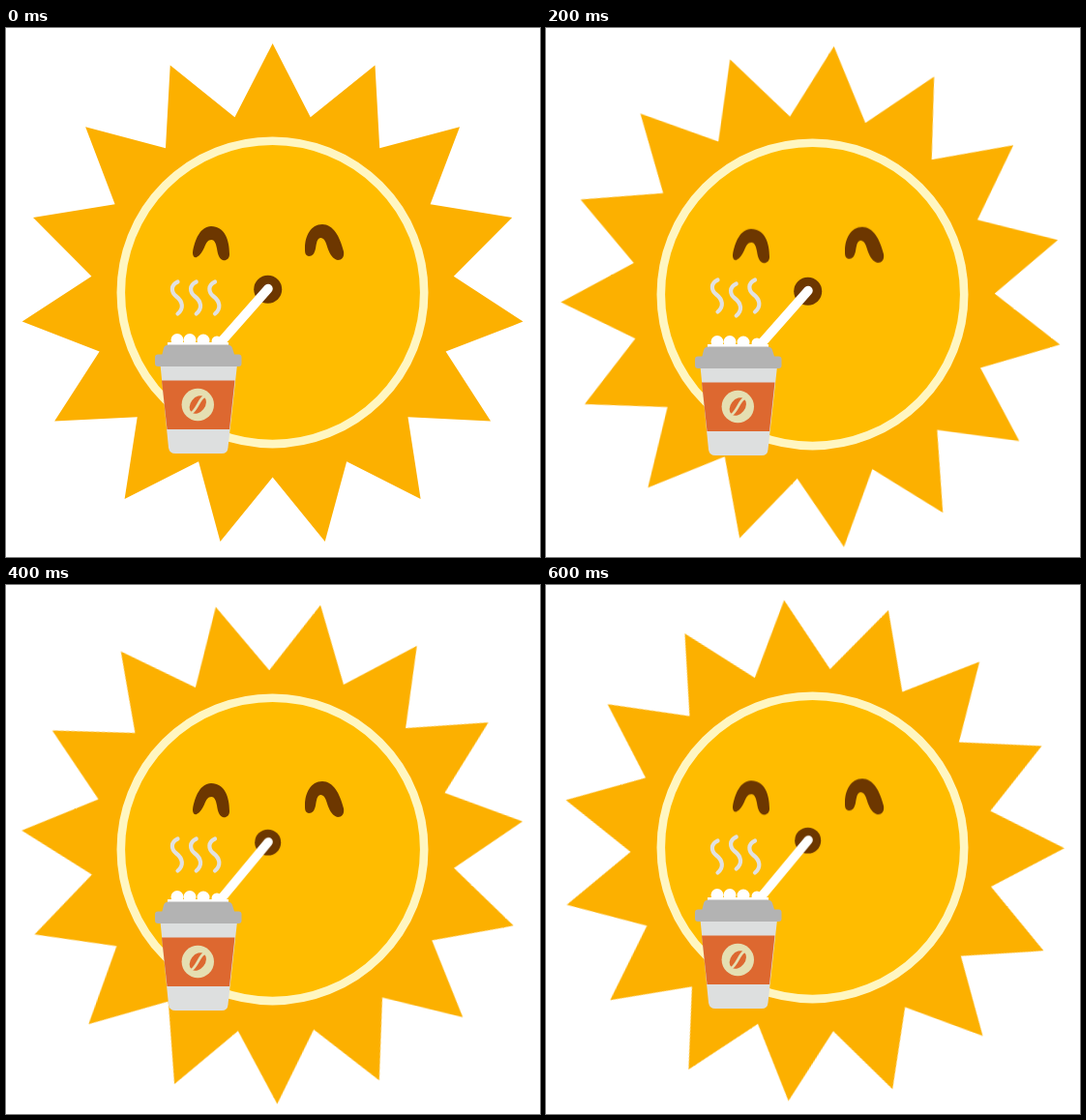
An HTML page that plays this animation: 552 px wide and 547 px high, repeating every 800 ms.

```html
<!DOCTYPE html>
<html lang="en">
<head>
<meta charset="utf-8">
<title>Sun sipping coffee</title>
<style>
  html, body { margin: 0; width: 100%; height: 100%; overflow: hidden; background: #fff; }
  svg { display: block; width: 100vw; height: 100vh; }

  .bob, #rays, .sip, .straw { animation: 800ms step-end infinite; }
  .bob { --d: 2px; animation-name: bob; }
  .eyes { --d: 2.7px; }
  .steam.outer { --d: -2px; }
  #rays { transform-origin: 275.6px 276.4px; animation-name: turn; }
  .sip { transform-origin: 270.7px 270.2px; animation-name: sip; }
  .straw { transform-origin: 222px 325px; animation-name: lean; }

  @keyframes bob {
    0%, 50%, 100% { transform: translateY(0); }
    25% { transform: translateY(var(--d)); }
    75% { transform: translateY(calc(var(--d) * -1)); }
  }
  @keyframes turn {
    0% { transform: rotate(0deg); }
    25% { transform: rotate(4.85deg); }
    50% { transform: rotate(10.95deg); }
    75%, 100% { transform: rotate(17.5deg); }
  }
  @keyframes sip {
    0%, 100% { transform: none; }
    50% { transform: translateY(-4px) scale(.93); }
  }
  @keyframes lean {
    0%, 100% { transform: none; }
    50% { transform: skewY(-4.2deg); }
  }

  .eyes, .sip { fill: #6d3700; }
  .straw { stroke: #fff; stroke-width: 9.5; stroke-linecap: round; }
  .steam { fill: none; stroke: #e1e1e1; stroke-width: 4.2; stroke-linecap: round; }
</style>
</head>
<body>
<svg viewBox="0 0 552 547" preserveAspectRatio="none">
  <defs>
    <path id="wisp" d="M177.5 262.5C170 266 170.5 273 176 277.5C183 283 184 290 177.5 295.5"/>
  </defs>

  <g class="bob">
    <polygon id="rays" fill="#fcb000"/>
    <circle cx="275.5" cy="273.4" r="156.7" fill="#ffbc00" stroke="#fff6c1" stroke-width="8.6"/>
  </g>

  <g class="bob eyes">
    <path d="M193 232C195 219 201 205 212 205C226 205 231 219 231 234C231 239 227 241 224 240C220 238 219 234 218 228C217 222 215 219 212.500 219C208.500 219 207 222 205 227C203 231 201 235 197 237C194 238 193 235 193 232Z"/>
    <path d="M309 228C309 215 315 203 327 203C338 203 345 215 349 231C350 237 347 240 343 240C338 239 335 234 333 229C331 223 330 217.500 325.500 217C321.500 217 321 222 320 228C319 233 317 236 313 236C309 235 309 232 309 228Z"/>
  </g>

  <g class="bob">
    <circle class="sip" cx="270.7" cy="270.2" r="14.5"/>
    <path class="straw" d="M271 269.500L222 325"/>

    <g fill="#fff">
      <path d="M167 329V325H230V329Z"/>
      <circle cx="177" cy="322.5" r="6.5"/>
      <circle cx="190" cy="322.5" r="6.5"/>
      <circle cx="204" cy="323" r="6.500"/>
      <circle cx="218" cy="324" r="5.500"/>
    </g>

    <path fill="#dddfdf" d="M159.500 348H239L229.500 434Q229 440 223 440H175Q169 440 168 434Z"/>
    <path fill="#dd6830" d="M161 364.500H236.500L231 415H166.500Z"/>
    <rect x="154" y="337.500" width="89.500" height="12.500" rx="3" fill="#b3b3b3"/>
    <path fill="#b3b3b3" d="M161 339L163 331Q164 327.500 168 327.500H229Q233 327.500 234 331L236.500 339Z"/>

    <circle cx="198.300" cy="389.500" r="16.700" fill="#e5dfb2"/>
    <g transform="rotate(38 198.300 389.500)">
      <ellipse cx="198.300" cy="389.500" rx="7.500" ry="10.300" fill="#dd6830"/>
      <path d="M198.300 378.500C195.800 384 200.800 394 198.300 400.500" fill="none" stroke="#e5dfb2" stroke-width="2.800"/>
    </g>
  </g>

  <g class="bob steam outer">
    <use href="#wisp"/>
    <use href="#wisp" x="38.500"/>
  </g>
  <g class="bob steam">
    <use href="#wisp" x="19.200"/>
  </g>
</svg>
<script>
  // Fifteen-pointed star: tips and notches alternate around the centre.
  const spikes = 15, tip = 260.3, notch = 188.2;
  const points = Array.from({ length: spikes * 2 }, (_, i) => {
    const a = i * Math.PI / spikes, r = i % 2 ? notch : tip;
    return `${(275.6 + r * Math.sin(a)).toFixed(2)},${(276.4 - r * Math.cos(a)).toFixed(2)}`;
  });
  document.getElementById('rays').setAttribute('points', points.join(' '));
</script>
</body>
</html>
```
